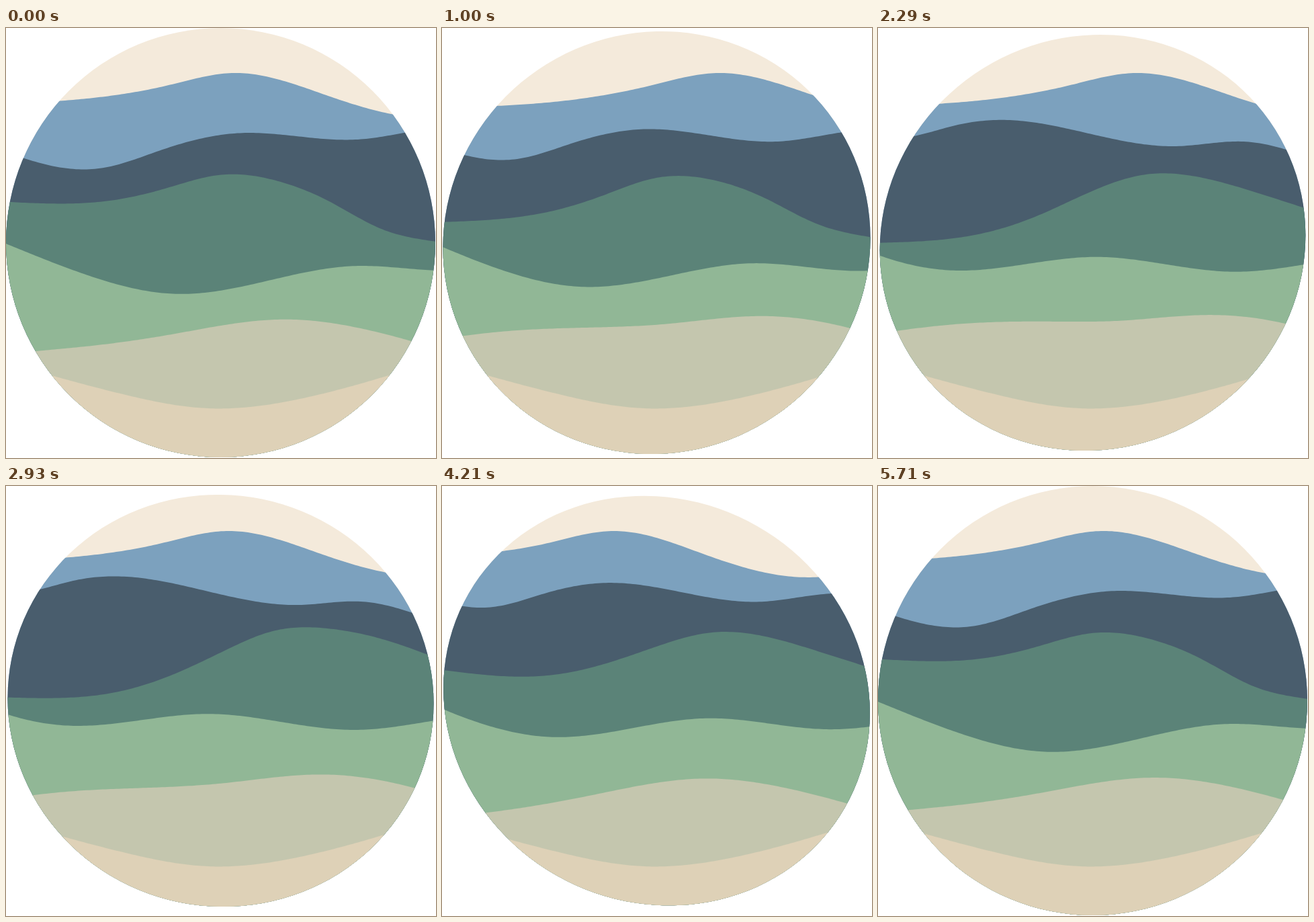
Write an HTML page with a canvas that moves like this. It is 640 by 640 pixels and loops after 5.78 s.

```html
<!DOCTYPE html>
<html lang="en">
<head>
<meta charset="utf-8">
<title>Rolling hills</title>
<style>
  html, body { margin: 0; width: 100%; height: 100%; overflow: hidden; background: #fff; }
  canvas { display: block; width: 100vw; height: 100vh; }
</style>
</head>
<body>
<canvas id="stage" width="640" height="640"></canvas>
<script>
const SIZE = 640, RADIUS = 319.5, LOOP = 5780, FPS = 14, LAST_STEP = 80;
const SKY = '#f4eadb';
const ctx = document.getElementById('stage').getContext('2d');

const ease = p => (1 - Math.cos(Math.PI * p)) / 2;

// Natural cubic spline through the points, returned as a function of x.
function spline(points) {
  const n = points.length, bend = Array(n).fill(0), carry = Array(n).fill(0);
  const gap = i => points[i + 1].x - points[i].x;
  const slope = i => (points[i + 1].y - points[i].y) / gap(i);
  for (let i = 1; i < n - 1; i++) {
    const span = gap(i - 1) + gap(i), ratio = gap(i - 1) / span;
    const pivot = ratio * bend[i - 1] + 2;
    bend[i] = (ratio - 1) / pivot;
    carry[i] = (6 * (slope(i) - slope(i - 1)) / span - ratio * carry[i - 1]) / pivot;
  }
  for (let i = n - 2; i > 0; i--) bend[i] = bend[i] * bend[i + 1] + carry[i];
  return x => {
    let i = 0;
    while (i < n - 2 && x > points[i + 1].x) i++;
    const h = gap(i), a = (points[i + 1].x - x) / h, b = 1 - a;
    return a * points[i].y + b * points[i + 1].y
      + ((a ** 3 - a) * bend[i] + (b ** 3 - b) * bend[i + 1]) * h * h / 6;
  };
}

// Each hill has a few key points [x, y, dx, dy] that swing by (dx, dy) once per loop.
// lag(x) is the phase of the swing.
const hills = [
  { color: '#7ca1be', lag: () => 1.53, points: [
    [-60, 114.5, 82, 4.5], [100, 106.5, 82, 3], [237, 85.5, 82, 0], [335, 67, 82, 0],
    [473, 100, 82, -2], [611, 133.5, 82, -2], [740, 122, 82, 0]
  ] },
  { color: '#495d6d', lag: () => 0, points: [
    [-70, 148, 40, 25], [82, 183.5, 57, 25.5], [165, 161.5, 65, 20.5], [262, 145.5, 88, 10.8],
    [480, 171.5, 42, -5.5], [605, 158, 76, -14], [720, 182, 86, -17]
  ] },
  { color: '#5b8378', lag: x => 2.6 + Math.min(0.9, x / 400), points: [
    [0, 287, 0, 33], [160, 282, 0, 26], [240, 261, 0, 23], [320, 233, 0, 15],
    [400, 221, 0, -6], [480, 235, 0, -24], [560, 264, 0, -38], [640, 287, 0, -33]
  ] },
  { color: '#91b796', lag: () => 0, points: [
    [-60, 304, 60, 17], [70, 356.5, 56, 13], [176, 376.3, 79, 19.5],
    [411, 346.7, 108, 7.5], [585, 362, 64, -1], [690, 352, 70, 0]
  ] },
  { color: '#c4c6ae', lag: () => 2.06, points: [
    [-70, 486, 60, -32], [60, 468.3, 60, -30], [160, 461.2, 85, -26.8], [285, 449, 80, -14.5],
    [443, 431.5, 62, -4.8], [535, 440.7, 58, -5], [690, 483, 55, -2]
  ] },
  { color: '#ded1b7', lag: () => 0, points: [
    [0, 498], [180, 546.5], [299, 566], [440, 551.5], [640, 495]
  ] }
];

function ridge({ lag, points }, turn) {
  return spline(points.map(([x, y, dx = 0, dy = 0]) => {
    const swing = Math.cos(turn - lag(x));
    return { x: x + dx * swing, y: y + dy * swing };
  }));
}

// The disc eases through three poses: round, leaning right, leaning left.
const poses = [
  { insetX: 0, insetY: 0, tilt: 0 },
  { insetX: 2.7, insetY: 9.4, tilt: -4400 },
  { insetX: 2.3, insetY: 16, tilt: 6300 }
];

function clipDisc(progress) {
  const at = progress * poses.length, i = Math.floor(at), p = ease(at - i);
  const from = poses[i % poses.length], to = poses[(i + 1) % poses.length];
  const mix = key => from[key] + (to[key] - from[key]) * p;
  const rx = RADIUS - mix('insetX'), ry = RADIUS - mix('insetY'), lean = mix('tilt') / rx;
  ctx.save();
  ctx.transform(rx, lean, 0, Math.sqrt(ry * ry - lean * lean), RADIUS, RADIUS);
  ctx.beginPath();
  ctx.arc(0, 0, 1, 0, 2 * Math.PI);
  ctx.restore();
  ctx.clip();
}

function draw(progress) {
  ctx.clearRect(0, 0, SIZE, SIZE);
  ctx.save();
  clipDisc(progress);
  ctx.fillStyle = SKY;
  ctx.fillRect(0, 0, SIZE, SIZE);
  for (const hill of hills) {
    const height = ridge(hill, 2 * Math.PI * progress);
    ctx.beginPath();
    ctx.moveTo(0, SIZE);
    for (let x = 0; x <= SIZE; x += 4) ctx.lineTo(x, height(x));
    ctx.lineTo(SIZE, SIZE);
    ctx.fillStyle = hill.color;
    ctx.fill();
  }
  ctx.restore();
}

const start = performance.now();
function tick() {
  const t = (performance.now() - start) % LOOP;
  const step = Math.min(LAST_STEP, Math.floor((t + 5) * FPS / 1000));
  draw(step * 1000 / FPS / LOOP);
  requestAnimationFrame(tick);
}
tick();
</script>
</body>
</html>
```
